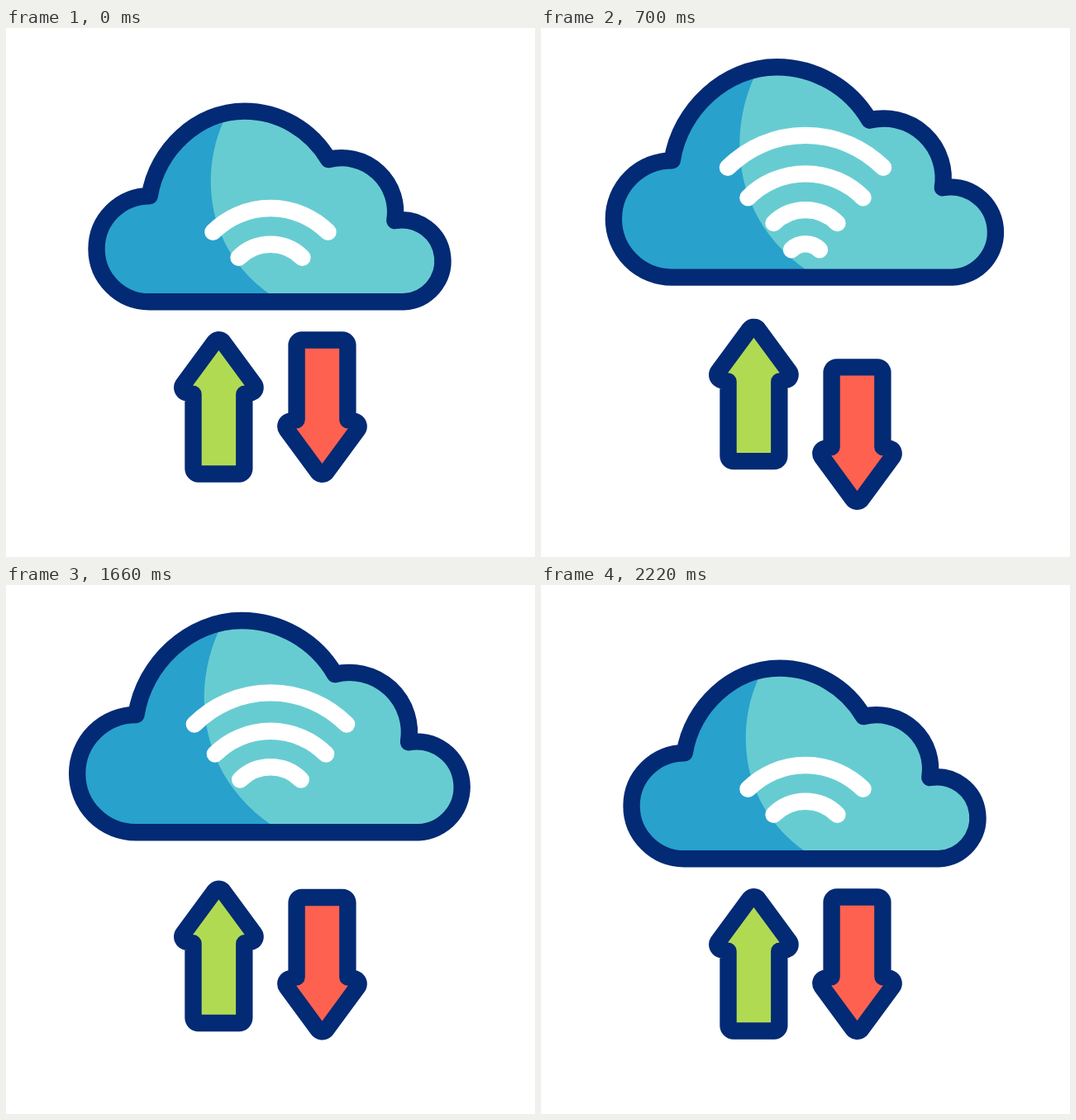
These frames come from a looping animation (640x640 px, 2.4 s). An HTML page with a canvas:

```html
<!DOCTYPE html>
<html lang="en">
<head>
<meta charset="utf-8">
<title>Cloud transfer</title>
<style>
  html, body { margin: 0; width: 100%; height: 100%; overflow: hidden; background: #fff; }
  canvas { display: block; }
</style>
</head>
<body>
<canvas id="stage" width="640" height="640"></canvas>
<script>
const ctx = document.getElementById('stage').getContext('2d');
const LOOP = 2400, START = 200, END = 2200, BEAT = 500, BOUNCE = 686;
const NAVY = '#032a74', LINE = 20.4;

const cloud = new Path2D(`M157 299.3 A71 71 0 0 1 157.5 157 C167 95 222 43 285 43
  A131 131 0 0 1 398 108 A72.5 72.5 0 0 1 487 190.2 A55 55 0 1 1 499 299.3 Z`);
const shade = new Path2D('M264 43 C228 105 221 222 322 291 V310 H60 V30 H264 Z');

// Upward arrow around x = 0: rim is stroked, core is the coloured inside
const rim = new Path2D('M0 383.5 L37.9 435 H24.6 V533.2 H-24.6 V435 H-37.9 Z');
const core = new Path2D(`M0 390 L31.3 432.6 A10.5 10.5 0 0 0 20.7 443 V529.3 H-20.7 V443
  A10.5 10.5 0 0 0 -31.3 432.6 Z`);

const waveRadius = [24, 54.4, 98.4, 133]; // at each beat of a wave's life

const clamp = (x, lo, hi) => Math.max(lo, Math.min(hi, x));

function smooth(x) {
  const u = clamp(x, 0, 1);
  return u * u * (3 - 2 * u);
}

// Repeated bounce that starts late by the given delay and comes to rest at the end
function bounce(t, delay) {
  const since = Math.max(0, t - 171 - delay);
  return Math.min(Math.sin(Math.PI * since / BOUNCE) ** 2, smooth((END + 10 - t) / 230));
}

function drawCloud(cy, scale) {
  ctx.save();
  ctx.translate(320, cy);
  ctx.scale(scale, scale);
  ctx.translate(-320, -171);
  ctx.fillStyle = '#67ccd1';
  ctx.fill(cloud);
  ctx.save();
  ctx.clip(cloud);
  ctx.fillStyle = '#28a1cd';
  ctx.fill(shade);
  ctx.restore();
  ctx.strokeStyle = NAVY;
  ctx.lineWidth = LINE / scale;
  ctx.stroke(cloud);
  ctx.restore();
}

// A wave of age 0 to 3 beats rises and widens
function drawWave(cy, age) {
  const i = Math.min(Math.floor(age), 2);
  const r = waveRadius[i] + (waveRadius[i + 1] - waveRadius[i]) * (age - i);
  const top = cy + 87 - 39.6 * age - 1.4 * age * age;
  ctx.beginPath();
  ctx.arc(320, top + r, r, -0.75 * Math.PI, -0.25 * Math.PI);
  ctx.strokeStyle = '#fff';
  ctx.lineWidth = LINE;
  ctx.stroke();
}

function drawWaves(cy, t) {
  const moving = t > START - 5 && t < END + 15;
  const phase = moving ? (t - START) / BEAT % 1 : 0;
  // On each beat the newborn and the widest wave are briefly both visible
  const slack = moving ? 0.03 : -0.03;
  for (let k = -1; k <= 3; k++) {
    const age = phase + k;
    if (age > -slack && age < 3 + slack) drawWave(cy, clamp(age, 0, 3));
  }
}

function drawArrow(x, y, flip, color) {
  ctx.save();
  ctx.translate(x, y);
  ctx.scale(1, flip);
  ctx.fillStyle = ctx.strokeStyle = NAVY;
  ctx.lineWidth = 33;
  ctx.fill(rim);
  ctx.stroke(rim);
  ctx.fillStyle = color;
  ctx.fill(core);
  ctx.restore();
}

function draw(t) {
  ctx.fillStyle = '#fff';
  ctx.fillRect(0, 0, 640, 640);
  ctx.lineJoin = ctx.lineCap = 'round';
  const grow = smooth((t - START) / 600) * smooth((END - t) / 400);
  const cy = 215.8 - 44.8 * grow;
  drawCloud(cy, 0.9 + 0.1 * grow);
  drawWaves(cy, t);
  drawArrow(257.4, -35.8 * bounce(t, 0), 1, '#b1da53');
  drawArrow(382.5, 917 + 39.5 * bounce(t, 95), -1, '#ff6150');
}

const begin = performance.now();
function tick() {
  draw((performance.now() - begin) % LOOP);
  requestAnimationFrame(tick);
}
tick();
</script>
</body>
</html>
```
